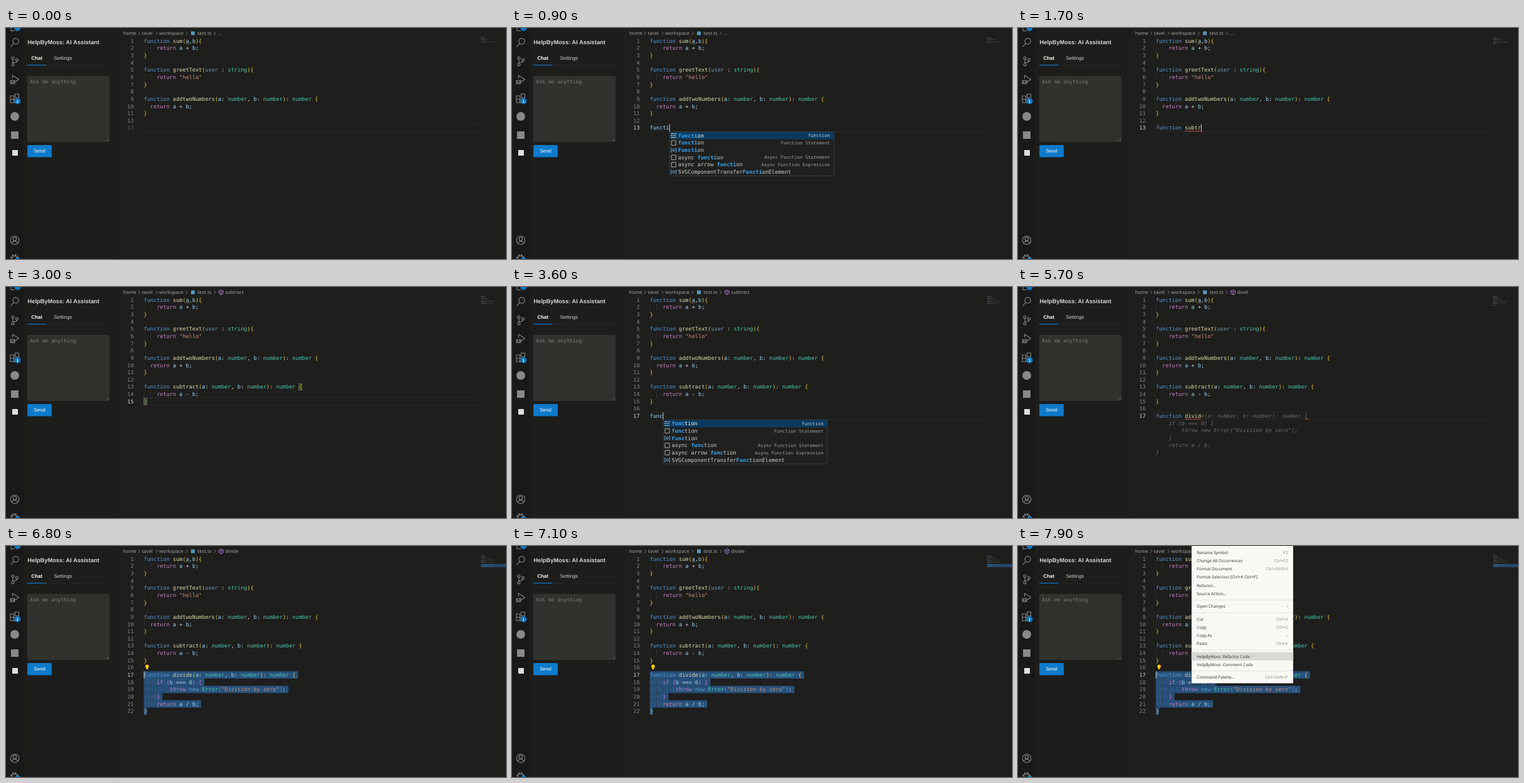
An HTML page that plays this animation: 800 by 371 pixels, repeating every 8 s.

```html
<!DOCTYPE html>
<html lang="en">
<head>
<meta charset="utf-8">
<title>Editor with inline completion</title>
<style>
html, body { margin: 0; width: 100%; height: 100%; overflow: hidden; background: #1e1e1d; }
svg { display: block; width: 100%; height: 100%; }
text { text-rendering: geometricPrecision; white-space: pre; }
.mono { font: 8.58px "DejaVu Sans Mono", monospace; }
.detail { font: 7.29px "DejaVu Sans Mono", monospace; }
.hint { font: 8.17px "DejaVu Sans Mono", monospace; }
.ui { font: 7.7px "Noto Sans", sans-serif; }
.menu { font: 6.58px "Noto Sans", sans-serif; }
.form { font: 7.97px "Liberation Sans", Arial, sans-serif; }
.title { font: bold 9.33px "Liberation Sans", Arial, sans-serif; }
.badge { font: bold 6px "Liberation Sans", Arial, sans-serif; }
.bold { font-weight: bold; }
.ghost { font-style: italic; }
.icon { fill: none; stroke: #898987; stroke-width: 1.1; }
</style>
</head>
<body>
<svg viewBox="0 0 800 371">
  <rect width="800" height="371" fill="#1e1e1d"/>
  <rect width="28" height="371" fill="#191919"/>
  <rect x="28" width="152" height="371" fill="#1d1d1c"/>
  <g class="icon">
    <path d="M8 0V4.5H14"/>
    <circle cx="15.6" cy="21.3" r="4.7"/><path d="M12.3 24.8L7.5 30.5"/>
    <circle cx="11" cy="48.3" r="2"/><circle cx="11" cy="58.7" r="2"/><circle cx="17.5" cy="51" r="2"/>
    <path d="M11 50.3V56.7M17.5 53Q17.5 55.5 14.5 55.5H11"/>
    <path d="M10.5 81V76L20.5 82.5L14 87"/><circle cx="10.5" cy="86.8" r="2.8"/>
    <path d="M6.5 84L8 85M6.5 90L8 89M6 87H15M14.5 90L13 89M14.5 84L13 85"/>
    <path d="M7 109H12.5V120H7ZM7 114.5H18V120H12.5M14.5 106H20.5V112H14.5Z"/>
    <circle cx="14" cy="341" r="6.8"/><circle cx="14" cy="339" r="2.7"/><path d="M9 345.5Q14 339 19 345.5"/>
    <circle cx="13.5" cy="370" r="5.5" stroke-width="2" stroke-dasharray="2.7 1.6"/><circle cx="13.5" cy="370" r="3.8"/>
  </g>
  <circle cx="14" cy="142" r="7" fill="#898987"/>
  <rect x="8" y="166" width="12" height="12" fill="#898987"/>
  <rect x="10" y="196" width="9" height="9" fill="#dededc"/>
  <g fill="#0e78c2">
    <circle cx="18.5" cy="0" r="5"/><circle cx="18.5" cy="117.5" r="5"/><circle cx="18.5" cy="373" r="4.5"/>
  </g>
  <text class="badge" x="16.8" y="119.7" fill="#fff">1</text>

  <text class="title" x="34.5" y="25.5" fill="#d6d6d4">HelpByMoss: AI Assistant</text>
  <text class="form bold" x="40.5" y="51" fill="#fff">Chat</text>
  <text class="form" x="76.8" y="51" fill="#d0d0ce">Settings</text>
  <path d="M34 60H166" stroke="#2c2c2b" stroke-width=".7"/>
  <rect x="34" y="59" width="30.7" height="1.1" fill="#0e7ac8"/>
  <rect x="34" y="77" width="131.7" height="106" rx="2" fill="#31312d"/>
  <path d="M160.5 182L165 177.5M163 182L165 180" stroke="#777" stroke-width=".6"/>
  <text class="hint" x="38.3" y="89" fill="#7b7b78">Ask me anything</text>
  <rect x="34.2" y="188" width="39" height="19.6" rx="1.5" fill="#0e7acb"/>
  <text class="form" x="44.4" y="200.4" fill="#fff">Send</text>
  <g id="view"></g>
</svg>
<script>
const LEFT = 220.5, CHAR = 5.165, ROW = 11.64, LOOP = 8000;
const view = document.getElementById('view');
const rowTop = n => 15 + (n - 1) * ROW;
const base = n => rowTop(n) + 8.75;
const colX = c => LEFT + c * CHAR;
const esc = s => String(s).replace(/&/g, '&amp;').replace(/</g, '&lt;');
const text = (x, y, s, fill, cls = 'mono', more = '') =>
  `<text class="${cls}" x="${x}" y="${y}" fill="${fill}" ${more}>${esc(s)}</text>`;
const rect = (x, y, w, h, fill, more = '') =>
  `<rect x="${x}" y="${y}" width="${w}" height="${h}" fill="${fill}" ${more}/>`;
const path = (d, stroke, width = .7) =>
  `<path d="${d}" fill="none" stroke="${stroke}" stroke-width="${width}"/>`;
const END = 'text-anchor="end"';

const intro = `function sum(a,b){
    return a + b;
}

function greetText(user : string){
    return "hello"
}

function addtwoNumbers(a: number, b: number): number {
  return a + b;
}
`.split('\n');
const subtract = `function subtract(a: number, b: number): number {
    return a - b;
}`.split('\n');
const divide = `function divide(a: number, b: number): number {
    if (b === 0) {
        throw new Error("Division by zero");
    }
    return a / b;
}`.split('\n');

// One capture group per colour; brackets come last and are coloured by depth.
const TOKEN = /\b(function|new)\b|\b(return|if|throw)\b|("[^"]*")|\b(number|string|Error)\b|((?<=function )\w+)|([a-z]\w*)|(\d+)|([^\s(){}]+?)|([(){}])/g;
const COLORS = ['#569cd6', '#c586c0', '#ce9178', '#4ec9b0', '#dcdcaa', '#9cdcfe', '#b5cea8', '#d4d4d4'];
const BRACKETS = ['#f0d02c', '#da70d6', '#2b9df0'];

function drawCode(lines) {
  let depth = 0, out = '';
  lines.forEach((line, i) => {
    const indent = line.search(/\S/);
    for (let c = 0; c < indent; c += 2)
      out += path(`M${colX(c) + .4} ${rowTop(i + 1)}v${ROW}`, '#3b3b39', .6);
    for (const m of line.matchAll(TOKEN)) {
      let fill = COLORS[m.slice(1).findIndex(g => g !== undefined)];
      if (m[9]) {
        if (/[)}]/.test(m[0])) depth--;
        fill = BRACKETS[Math.max(depth, 0) % 3];
        if (/[({]/.test(m[0])) depth++;
      }
      out += text(colX(m.index), base(i + 1), m[0], fill, 'mono', m[0] == 'user' ? 'opacity=".65"' : '');
    }
  });
  return out + [0, 2, 4].map(d => rect(288 + d, 25, .9, .9, '#b5b5b3')).join('');
}

function drawMinimap(lines) {
  return lines.map((line, i) => {
    const indent = line.search(/\S/), y = 15.1 + i * .87;
    if (indent < 0) return '';
    const word = /^function/.test(line) ? 8 : 0;
    return rect(760 + indent * .42, y, (line.length - indent) * .42, .6, '#6b7a76', 'opacity=".55"') +
      rect(760, y, word * .42, .6, '#56788f', 'opacity=".6"');
  }).join('');
}

function drawCrumbs(symbol) {
  const grey = '#a2a2a0', arrow = x => path(`M${x - 1.5} 5.7l2.8 2.8l-2.8 2.8`, grey);
  let out = [[187.5, 'home'], [217.5, 'tavel'], [245, 'workspace'], [306.5, 'test.ts']]
    .map(([x, s]) => text(x, 11.2, s, grey, 'ui')).join('');
  out += [213, 241, 289, 334].map(arrow).join('') + rect(296, 5.5, 6, 6, '#519aba');
  if (!symbol) return out + text(339, 11.2, '…', grey, 'ui');
  return out + path('M344 4.6l3.4 1.8v4.2l-3.4 1.9l-3.4-1.9v-4.2zM340.6 6.4l3.4 1.8l3.4-1.8M344 8.2v4.3', '#b180d7', .9) +
    text(350.5, 11.2, symbol, grey, 'ui');
}

const KINDS = {
  key: (x, y) => path(`M${x} ${y - 3}h5M${x + 6} ${y - 3}h3M${x} ${y}h3M${x + 4} ${y}h4M${x} ${y + 3}h6M${x + 7} ${y + 3}h2`, '#c8c8c6', 1.2),
  snip: (x, y) => path(`M${x + 1} ${y - 3.7}h7v7.4h-7z`, '#c0c0be', .9),
  type: (x, y) => path(`M${x + 2} ${y - 3}h-1.7v6h1.7M${x + 7} ${y - 3}h1.7v6h-1.7`, '#75beff', .8) +
    `<circle cx="${x + 4.5}" cy="${y}" r="1.8" fill="none" stroke="#75beff"/>`
};
const FUNCTION_ROWS = [
  ['key', 'function', 'function'], ['snip', 'function', 'Function Statement'], ['type', 'Function', ''],
  ['snip', 'async function', 'Async Function Statement'],
  ['snip', 'async arrow function', 'Async Function Expression'],
  ['type', 'SVGComponentTransferFunctionElement', '']
];

function drawSuggest(line, row) {
  const word = line.split(' ').pop();
  const loop = /^function de?$/.test(line);
  if (!word || !loop && !'function'.startsWith(line)) return '';
  const rows = loop ? [['snip', 'dowhile', 'Do-While Statement']] : FUNCTION_ROWS;
  const x = colX(line.length) + .7, y = rowTop(row + 1) + .3, h = rows.length * ROW + 1;
  let out = rect(x, y, 263, h, '#20201f', 'stroke="#454543" stroke-width=".7"') +
    rect(x + .4, y + .4, 262.2, ROW, '#0b3b60');
  rows.forEach(([kind, label, detail], i) => {
    const mid = y + .5 + (i + .5) * ROW, at = label.toLowerCase().indexOf(word);
    const hit = c => loop ? word.includes(label[c]) : c >= at && c < at + word.length;
    out += KINDS[kind](x + 2, mid);
    [...label].forEach((ch, c) => {
      out += text(x + 13.6 + c * CHAR, mid + 2.9, ch, hit(c) ? '#3aa6f2' : i ? '#cfcfcd' : '#fff', hit(c) ? 'mono bold' : 'mono');
    });
    out += text(x + 256.5, mid + 2.5, detail, i ? '#9b9b99' : '#c3ccd3', 'detail', END);
  });
  return out;
}

function drawGhost(full, typed, row) {
  return full.map((line, i) => {
    const from = i ? line.search(/\S/) : typed.length;
    return text(colX(from), base(row + i), line.slice(from), '#6c6c69', 'mono ghost');
  }).join('');
}

function squiggle(from, to, row) {
  let d = `M${colX(from)} ${base(row) + 2.2}`;
  for (let c = from; c < to; c += .5) d += 'q.65 -1.6 1.29 0t1.29 0';
  return path(d, '#d9663f', .8);
}

function drawSelection(lines, from) {
  let out = '';
  for (let n = from; n <= 22; n++) {
    const line = lines[n - 1];
    out += rect(LEFT, rowTop(n), line.length * CHAR + (n < 22 ? 4 : 0), ROW + .1, '#27507a');
    [...line].forEach((ch, c) => {
      if (ch == ' ') out += rect(colX(c) + 2.2, base(n) - 3.4, .9, .9, '#6d8ba6');
    });
  }
  return out + rect(760, 15 + (from - 1) * .87, 40, (23 - from) * .87, '#2a639a', 'opacity=".6"');
}

const MENU = [
  [10.5, 'Rename Symbol', 'F2'], [23.6, 'Change All Occurrences', 'Ctrl+F2'],
  [37, 'Format Document', 'Ctrl+Shift+I'], [50, 'Format Selection [Ctrl+K Ctrl+F]', ''],
  [63.2, 'Refactor...', ''], [76.5, 'Source Action...', ''], [97, 'Open Changes', '›'],
  [117.2, 'Cut', 'Ctrl+X'], [130.4, 'Copy', 'Ctrl+C'], [143.6, 'Copy As', '›'], [156.7, 'Paste', 'Ctrl+V'],
  [177.2, 'HelpByMoss: Refactor Code', ''], [190.2, 'HelpByMoss: Comment Code', ''],
  [211, 'Command Palette...', 'Ctrl+Shift+P']
];

function drawMenu(hover) {
  let out = rect(276.5, 0, 166, 223, '#000', 'opacity=".25" rx="2"') + rect(277.7, -2, 162.6, 222.5, '#f8f8f5');
  if (hover >= 0) out += rect(277.7, MENU[hover][0] - 6.6, 162.6, 13.2, '#d9d9d6');
  for (const y of [86.7, 107.2, 167, 200.6]) out += path(`M278 ${y}H440`, '#d8d8d5', .7);
  for (const [y, label, key] of MENU)
    out += text(286, y + 2.4, label, '#393937', 'menu') + text(431.8, y + 2.4, key, '#8b8b88', 'menu', END);
  return out;
}

const typed = (s, t, start, gap) => s.slice(0, Math.max(0, Math.floor((t - start) / gap) + 1));

function draw(t) {
  const lines = [...intro], first = t < 2800, second = t >= 3200 && t < 5900;
  let row = 13, line = '', ghost = '', symbol = '';
  let lastKey = 0, selectFrom = 0, brace = 0;
  if (first) {
    line = typed('function subtract', t, 400, 100);
    lines.push(line);
    lastKey = Math.min(t, 2000);
    if (t >= 2400) ghost = drawGhost(subtract, line, row);
  } else {
    lines.push(...subtract);
    row = 15; line = '}'; lastKey = 2000; brace = 13;
    if (t >= 2900) symbol = 'subtract';
    if (t >= 3100) { lines.push(''); row = 16; line = ''; brace = 0; lastKey = 3100; }
    if (second) {
      line = t < 4300 ? typed('function de', t, 3300, 80) : 'function d' + typed('ivid', t, 4600, 200);
      lines.push(line);
      row = 17;
      lastKey = Math.min(t, 5200);
      if (t >= 4900) symbol = line.slice(9);
      if (t >= 5500) ghost = drawGhost(divide, line, row) + squiggle(46.4, 47.4, row);
    }
    if (t >= 5900) {
      lines.push(...divide);
      row = 22; line = '}'; brace = 17; lastKey = 5200;
      symbol = t < 6100 ? 'divid' : 'divide';
      if (t >= 6200) {
        selectFrom = row = Math.max(17, 22 - Math.floor((t - 6100) / 100));
        line = ''; brace = 0; lastKey = Math.min(t, 6600);
      }
    }
  }
  // An accepted completion keeps the blink phase of the last key; it stays hidden on the closing brace.
  const caret = t >= 400 && !brace && (t - lastKey) % 1000 < 500;

  let out = drawCrumbs(symbol) + drawMinimap(lines);
  if (selectFrom) out += drawSelection(lines, selectFrom);
  else out += path(`M${LEFT} ${rowTop(row)}H757M${LEFT} ${rowTop(row) + ROW}H757`, '#2b2b2a', .8);
  lines.forEach((_, i) => {
    const fill = i + 1 != row ? '#858582' : t < 400 ? '#535351' : '#d0d0ce';
    out += text(204.4, base(i + 1), i + 1, fill, 'mono', END);
  });
  if (brace) for (const [n, c] of [[brace, lines[brace - 1].length - 1], [row, 0]])
    out += rect(colX(c), rowTop(n) + .4, CHAR, ROW - .8, '#20382a', 'stroke="#888886" stroke-width=".6"');
  out += drawCode(lines) + ghost;
  if ((first || second) && /^function \w/.test(line)) out += squiggle(9, line.length, row);
  if (caret) out += rect(colX(line.length), rowTop(row), 1.1, ROW, '#c4c4c2');
  if (first || second) out += drawSuggest(line, row);
  if (t >= 6700) out += '<circle cx="225.7" cy="193.3" r="2.8" fill="#ffcc00"/>' + rect(224.3, 195.6, 2.8, 2.4, '#ffcc00');
  if (t >= 7300) out += drawMenu(t < 7500 ? -1 : t < 7600 ? 13 : t < 7700 ? 12 : 11);
  return out;
}

let shown = -1;
function tick(now) {
  const t = Math.floor(now % LOOP / 100) * 100;
  if (t != shown) view.innerHTML = draw(shown = t);
  requestAnimationFrame(tick);
}
tick(0);
</script>
</body>
</html>
```
